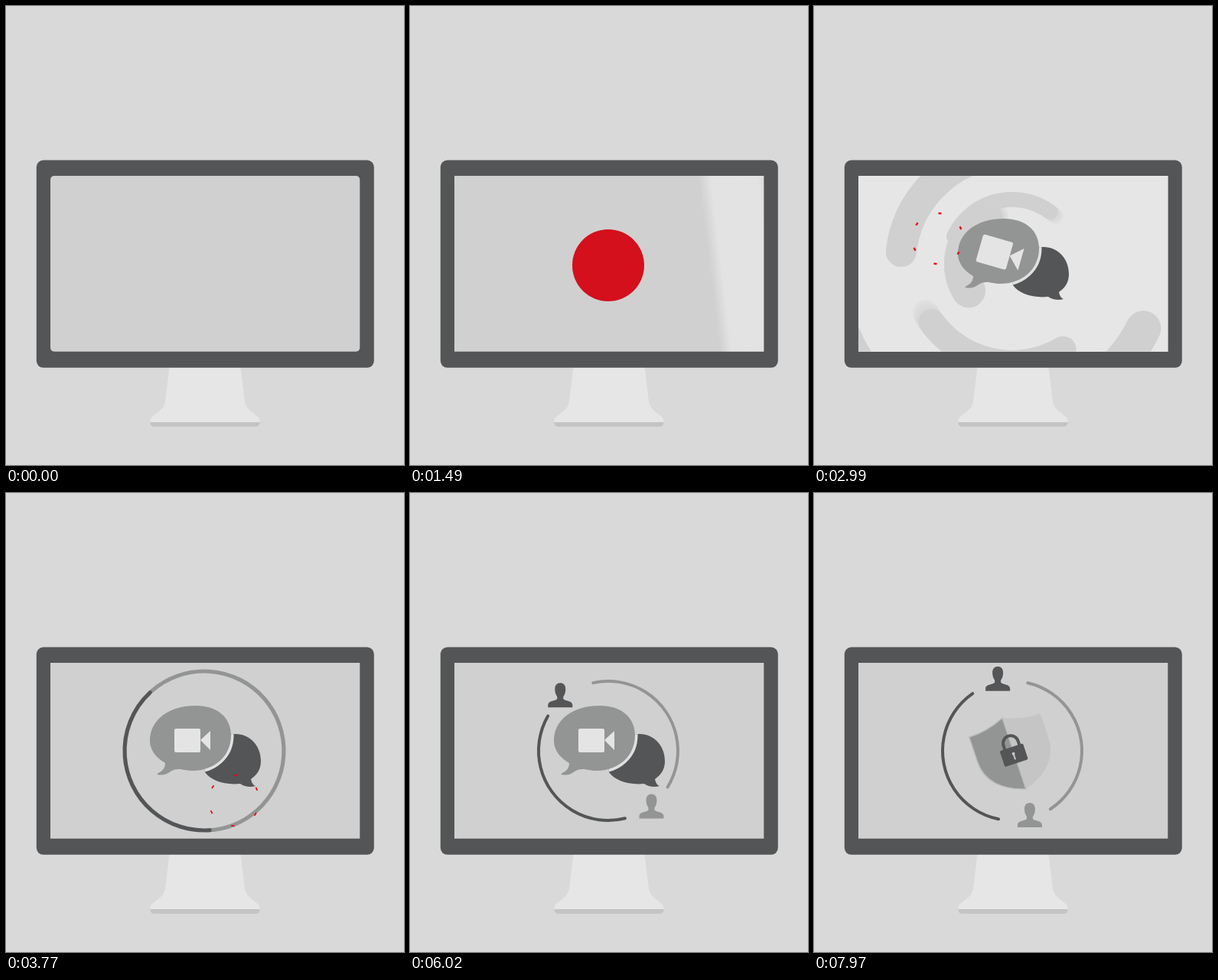
Write an HTML page with a canvas that moves like this. It is 520 px wide and 600 px high and loops after 8000 ms.

```html
<!DOCTYPE html>
<html lang="en">
<head>
<meta charset="utf-8">
<title>Screen animation</title>
<style>
html, body { margin: 0; width: 100%; height: 100%; overflow: hidden; background: #d9d9d9; }
canvas { display: block; }
</style>
</head>
<body>
<canvas id="stage" width="520" height="600"></canvas>
<script>
const LOOP = 8000;
const DARK = '#535556', GRAY = '#939594', PANEL = '#d0d0d0', LIGHT = '#e6e6e6', RED = '#e00d12';
const CX = 259, CY = 337;
const ctx = document.getElementById('stage').getContext('2d');

const clamp = v => Math.max(0, Math.min(1, v));
const span = (t, a, b) => clamp((t - a) / (b - a));
const mix = (a, b, p) => a + (b - a) * p;
const outCubic = p => 1 - (1 - p) ** 3;
const outBack = p => 1 + 2.7 * (p - 1) ** 3 + 1.7 * (p - 1) ** 2;
const inBack = p => 1 - outBack(1 - p);
const rad = deg => deg * Math.PI / 180;
// Angles count clockwise from the top.
const polar = (deg, r) => [CX + r * Math.sin(rad(deg)), CY - r * Math.cos(rad(deg))];

const shape = {
  stand: new Path2D('M213.5 472L208 517Q207 524 201 529L191 537Q188 540 188.5 544H331.5Q332 540 329 537L319 529Q313 524 312 517L306.5 472Z'),
  talk: new Path2D('M208 353C196 346 188 336 188 324C188 296 213 278 248 278C277 278 294 294 294 317C294 344 272 363 244 363C235 363 231 361 225 361C219 361 215 364 212 366C207 369 202 369 197.500 368C198 366 199 366 201 365C206 362 208 358 208 353Z'),
  reply: new Path2D('M298 315C318 314 333 330 333 350C333 362 328 368 320 374C321 379 323 382 326 383C320 385 311 384 306 380C285 382 268 376 260 365C258 350 270 316 298 315Z'),
  camera: new Path2D('M-21-15H9Q11-15 11-13V14Q11 16 9 16H-21Q-23 16-23 14V-13Q-23-15-21-15ZM11 0L24-12V13Z'),
  person: new Path2D('M0-16C5-16 7-12 7-8C7-4 6-1 4 2V5C7 8 16 7 16 13V16H-16V13C-16 7-7 8-4 5V2C-6-1-7-4-7-8C-7-12-5-16 0-16Z'),
  half: new Path2D('M0-49Q-25-38-49-39V-5C-49 22-30 40 0 49Z')
};

// radius, width, start angle, end angle, opacity
const glints = [
  [146, 27, 278, 317, .42], [83, 13, 310, 364, .45], [80, 15, 265, 300, .28],
  [120, 17, 188, 228, .4], [183, 36, 114, 140, .36], [29, 7, 262, 284, .4], [26, 6, 92, 112, .5]
];
const swirls = [
  [146, 40, 276, 350, 1], [84, 20, 295, 396, 1], [67, 44, 238, 330, 1],
  [130, 34, 149, 234, 1], [191, 46, 116, 170, 1], [240, 46, 228, 262, 1]
];

function arc(r, from, to, width, color, cap = 'round') {
  ctx.beginPath();
  ctx.arc(CX, CY, r, rad(from - 90), rad(to - 90));
  ctx.lineWidth = width;
  ctx.strokeStyle = color;
  ctx.lineCap = cap;
  ctx.stroke();
}

function place(x, y, scale, deg, draw) {
  if (scale <= 0) return;
  ctx.save();
  ctx.translate(x, y);
  ctx.rotate(rad(deg));
  ctx.scale(scale, scale);
  draw();
  ctx.restore();
}

function fill(path, color) {
  ctx.fillStyle = color;
  ctx.fill(path);
}

function box(x, y, w, h, r, color) {
  ctx.beginPath();
  ctx.roundRect(x, y, w, h, r);
  ctx.fillStyle = color;
  ctx.fill();
}

function monitor() {
  box(0, 0, 520, 600, 0, '#d9d9d9');
  box(188.5, 540, 143, 10, 5, '#c4c4c4');
  fill(shape.stand, LIGHT);
  box(39.8, 201.5, 441, 271.3, 9, DARK);
}

function drawGlints(t) {
  const grow = outCubic(span(t, 200, 900)) * (1 - span(t, 1000, 1450));
  if (!grow) return;
  const spin = (t - 950) * .25;
  for (const [r, w, a, b, alpha] of glints) {
    const end = a + (b - a) * grow + spin;
    for (let i = 0; i < 4; i++) {
      arc(r, a + spin + i * 2, Math.max(end, a + spin + i * 2), w, `rgba(255,255,255,${alpha * .3})`, 'butt');
    }
  }
}

function drawSheen(t) {
  if (t < 450 || t > 1790) return;
  const x = 90 + (t - 950) * .53;
  ctx.save();
  ctx.transform(1, 0, .122, 1, x - 222 * .122, 0);
  const g = ctx.createLinearGradient(0, 0, 160, 0);
  const stops = [[0, 0], [.1, .4], [.48, .4], [.6, .12], [.7, .4], [.9, .4], [1, 0]];
  for (const [at, alpha] of stops) g.addColorStop(at, `rgba(255,255,255,${alpha})`);
  ctx.fillStyle = g;
  ctx.fillRect(0, 215, 160, 245);
  ctx.restore();
}

function drawBadge(t) {
  const s = outBack(span(t, 906, 1306)) * (1 - inBack(span(t, 2080, 2340)));
  if (t < 906) return;
  place(259, 339, s, 0, () => {
    ctx.beginPath();
    ctx.arc(0, 0, 47, 0, 7);
    ctx.fillStyle = '#d3101c';
    ctx.fill();
  });
}

function drawFlash(t) {
  if (t < 2430 || t >= 3410) return;
  const open = 180 * span(t, 2430, 2800) ** 2;
  for (let i = 0; i < 4; i++) {
    const a = Math.min(180, open * (1.25 - i * .25));
    ctx.beginPath();
    ctx.moveTo(216, 359);
    ctx.arc(216, 359, 500, rad(165 - a), rad(165 + a));
    ctx.closePath();
    ctx.globalAlpha = open < 180 ? .4 : 1;
    ctx.fillStyle = LIGHT;
    ctx.fill();
  }
  ctx.globalAlpha = 1;

  const grow = outCubic(span(t, 2600, 2990));
  const close = span(t, 2990, 3400) ** 2;
  if (!grow) return;
  const spin = (t - 2990) * .25;
  for (const [r, w, a, b] of swirls) {
    const from = a + spin, to = from + mix((b - a) * grow, 360, close);
    const width = w * mix(grow, 3, close);
    arc(r, from, to, width, PANEL);
    for (const tail of [2, 4, 6]) arc(r, from, to + tail, width, 'rgba(208,208,208,.3)');
  }
}

function drawBurst(t, start, x, y, turn, length, width) {
  const p = span(t, start, start + 240);
  if (p <= 0 || p >= 1) return;
  for (let i = 0; i < 6; i++) {
    place(x, y, 1, turn + i * 60 + (p - .5) * 40, () => {
      ctx.fillStyle = RED;
      ctx.fillRect(-length / 2, -mix(25, 41, p) - width / 2, length, width);
    });
  }
}

function drawBubbles(t) {
  if (t < 2424 || t > 7750) return;
  const leave = span(t, 7200, 7700) ** 2;
  const talk = outCubic(span(t, 2424, 2795)) * (1 - leave);
  const reply = outCubic(span(t, 2446, 2817)) * (1 - leave);
  const away = 70 * Math.sqrt(leave);

  place(257 + away * 1.6, 362, reply, 0, () => {
    ctx.translate(-257, -362);
    fill(shape.reply, DARK);
    if (reply > .8 && !leave) {
      ctx.clip(shape.reply);
      ctx.lineWidth = 7;
      ctx.strokeStyle = '#e0e0e0';
      ctx.stroke(shape.talk);
    }
  });
  place(218 - away, 358, talk, 0, () => {
    ctx.translate(-218, -358);
    fill(shape.talk, GRAY);
    const pop = t < 2990 ? 1.2 * outCubic(span(t, 2760, 2980)) : mix(1.2, 1, outCubic(span(t, 2990, 3350)));
    const tilt = t < 2990 ? mix(-60, 16, span(t, 2760, 2990)) : mix(16, 0, outCubic(span(t, 2990, 3400)));
    place(243, 323, pop, tilt, () => fill(shape.camera, '#e4e4e4'));
  });
}

function drawOrbit(t) {
  if (t < 3440) return;
  const u = Math.max(0, (4250 - t) / 480), s = (t - 6020) / 1000;
  const turn = 13 * s + 43 * u * u;
  const r = 91 + 13 * u, width = 4 + 1.2 * u;
  ctx.globalAlpha = span(t, 3430, 3600);
  const ring = (mid, half, color) => arc(r, mid + turn - half, mid + turn + half, width, color);
  ring(54.5, 67 + 42.5 * Math.min(u, 1), GRAY);
  ring(233, 67 + 3.5 * u, DARK);
  ctx.globalAlpha = 1;

  if (t < 4000) return;
  const pop = outBack(span(t, 4000, 4250));
  place(...polar(-40.8 + 15.1 * s, 96), pop, 0, () => fill(shape.person, DARK));
  place(...polar(142.1 + 11.6 * s, 92 - 2.56 * s), pop, 0, () => fill(shape.person, GRAY));
}

function drawShield(t) {
  if (t < 7500) return;
  const tilt = -18.4 - 100 * (1 - span(t, 7500, 7970)) ** 2;
  place(261.5, 340.5, outBack(span(t, 7500, 7900)), tilt, () => {
    fill(shape.half, GRAY);
    ctx.save();
    ctx.scale(-1, 1);
    fill(shape.half, '#c5c5c5');
    ctx.restore();
    ctx.lineWidth = 1.5;
    ctx.strokeStyle = '#bdbdbd';
    ctx.stroke(shape.half);

    ctx.beginPath();
    ctx.moveTo(-10, -7);
    ctx.lineTo(-10, -14);
    ctx.arc(0, -14, 10, Math.PI, 0);
    ctx.lineTo(10, -7);
    ctx.lineWidth = 4;
    ctx.lineCap = 'butt';
    ctx.strokeStyle = DARK;
    ctx.stroke();
    box(-17, -9, 32, 22, 2, DARK);
    box(-3, -2, 4, 4, 2, '#c5c5c5');
    box(-2, 1, 2, 7, 0, '#c5c5c5');
  });
}

function render(t) {
  monitor();
  ctx.save();
  ctx.beginPath();
  ctx.roundRect(58, 222, 404.3, 229.7, t < 200 ? 5 : 0);
  ctx.fillStyle = PANEL;
  ctx.fill();
  ctx.clip();
  drawSheen(t);
  drawGlints(t);
  drawBadge(t);
  drawFlash(t);
  drawOrbit(t);
  drawBubbles(t);
  drawShield(t);
  drawBurst(t, 2870, 161.5, 304, 5, 4, 2.4);
  drawBurst(t, 3650, 298, 402, 2.6, 4.5, 1.8);
  ctx.restore();
}

const start = performance.now();
function tick() {
  render((performance.now() - start) % LOOP);
  requestAnimationFrame(tick);
}
tick();
</script>
</body>
</html>
```
